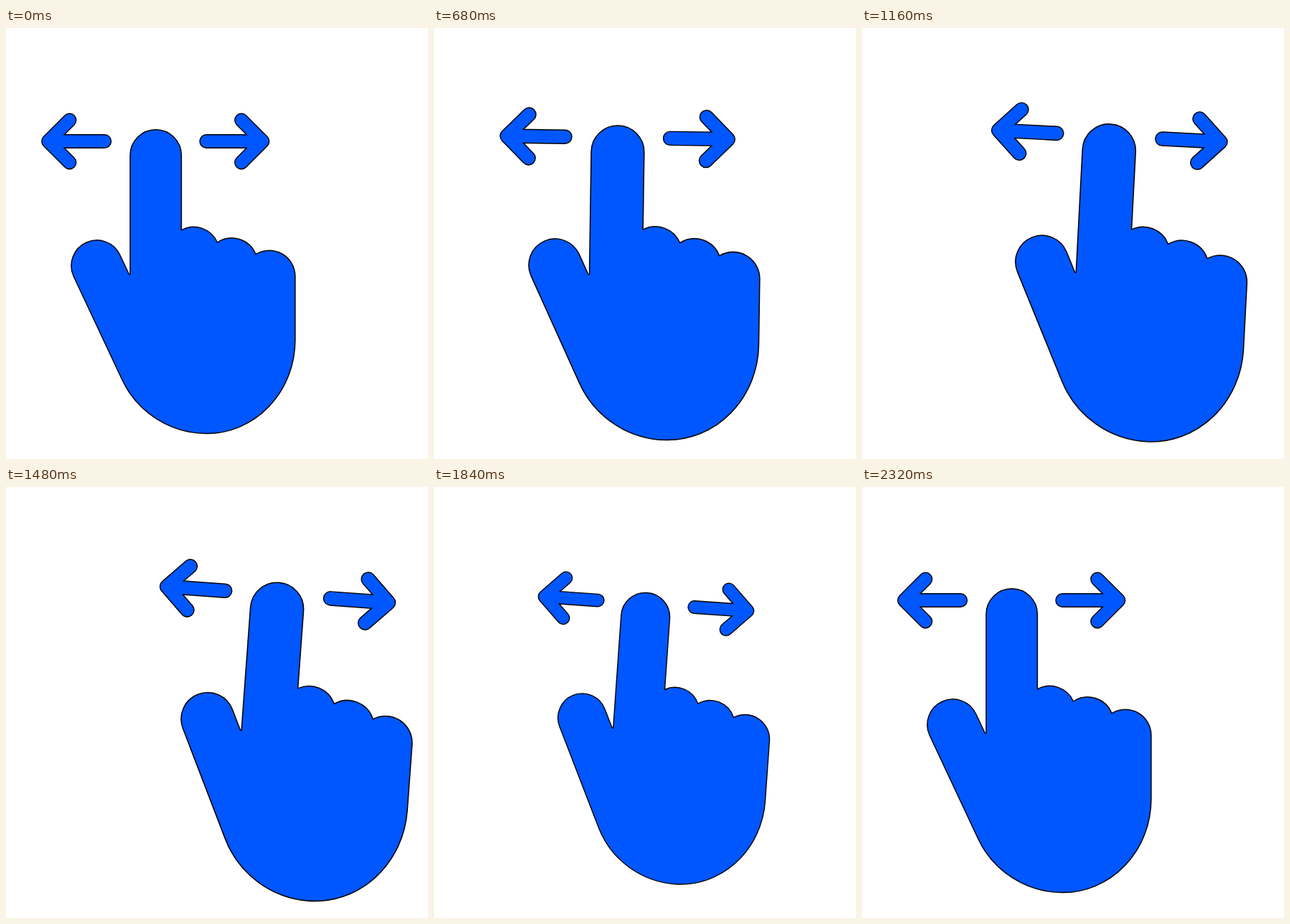
Recreate the animation shown at these times as an HTML page. Size 588 by 601 pixels, loop 2680 ms.

```html
<!DOCTYPE html>
<html lang="en">
<head>
<meta charset="utf-8">
<title>Swipe gesture</title>
<style>
  html, body { margin: 0; width: 100%; height: 100%; overflow: hidden; background: #fff; }
  svg { display: block; width: 588px; height: 601px; }
  .hand { fill: #0057ff; stroke: #000; stroke-width: 1.5; stroke-linejoin: round; }
  .arrow { fill: none; stroke-linecap: round; stroke-linejoin: round; }
  .edge { stroke: #000; stroke-width: 19.8; }
  .core { stroke: #0057ff; stroke-width: 17; }
</style>
</head>
<body>
<svg viewBox="0 0 588 601">
  <defs>
    <path id="arrowLine" d="M88.5 128.5 L59 158 L88.5 187.5 M59 158 H137.3"/>
    <g id="arrow" class="arrow">
      <use href="#arrowLine" class="edge"/>
      <use href="#arrowLine" class="core"/>
    </g>
  </defs>
  <g id="gesture">
    <use href="#arrow"/>
    <use href="#arrow" transform="translate(416.5 0) scale(-1 1)"/>
    <path class="hand" d="M173 343.5 V177.5 A35.7 35.7 0 0 1 244.4 177.5 V281.8
      A36 36 0 0 1 294.5 299 A36 36 0 0 1 348 315.6 A36 36 0 0 1 402.9 346 V435
      A122.9 130.5 0 0 1 280 565.5 A130.5 130.5 0 0 1 161.7 490.3
      L94.3 346.5 A35.5 35.5 0 0 1 158.8 316.5 L171.5 343.5 Z"/>
  </g>
</svg>
<script>
const LOOP = 2680, STEP = 40;
const PIVOT_X = 248.25, PIVOT_Y = 300;
const START = 280, TURN = 1720, END = 2320;

// Timing curve cubic-bezier(x1, 0, x2, 1), solved by bisection.
function ease(u, x1 = 1 / 3, x2 = 2 / 3) {
  let low = 0, high = 1, s = u;
  for (let i = 0; i < 24; i++) {
    s = (low + high) / 2;
    const x = 3 * s * (1 - s) * ((1 - s) * x1 + s * x2) + s ** 3;
    if (x < u) low = s; else high = s;
  }
  return s * s * (3 - 2 * s);
}

// Eased change from one value to another, as an offset to add up.
function move(time, from, to, amount, x1, x2) {
  const u = Math.min(1, Math.max(0, (time - from) / (to - from)));
  return u === 1 ? amount : u === 0 ? 0 : amount * ease(u, x1, x2);
}

function pose(time) {
  const swipe = 167.7, overshoot = 42, tilt = 4.5, grow = .0375, squash = .05;
  return {
    x: move(time, START, TURN, swipe, .26, .51)
      - move(time, TURN, 2000, swipe + overshoot, .28, .64)
      + move(time, 2000, END, overshoot),
    angle: move(time, START, TURN, tilt) - move(time, TURN, END, tilt),
    scale: 1 + move(time, START, 800, grow)
      - move(time, TURN, 1840, grow + squash)
      + move(time, 1840, END, squash)
  };
}

const gesture = document.getElementById("gesture");
const startTime = performance.now();

function draw() {
  const elapsed = (performance.now() - startTime) % LOOP;
  const { x, angle, scale } = pose(Math.floor(elapsed / STEP) * STEP);
  gesture.setAttribute("transform",
    `translate(${PIVOT_X + x} ${PIVOT_Y}) rotate(${angle}) scale(${scale}) ` +
    `translate(${-PIVOT_X} ${-PIVOT_Y})`);
  requestAnimationFrame(draw);
}
draw();
</script>
</body>
</html>
```
